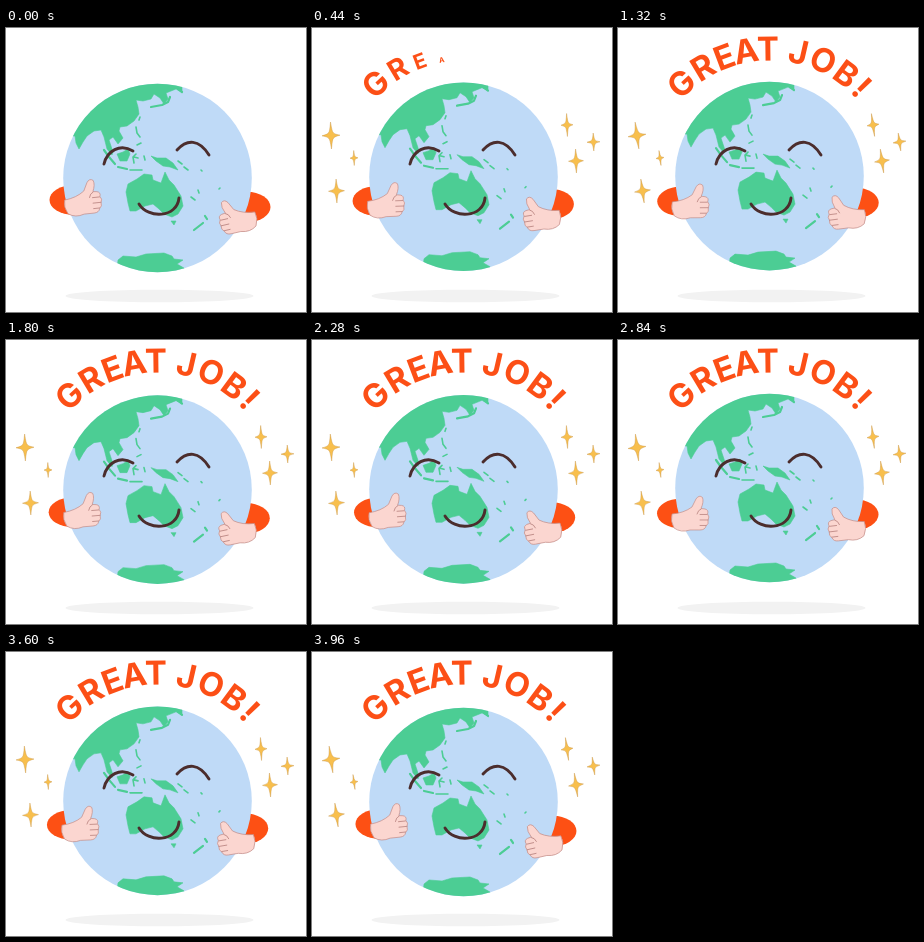
Recreate the animation shown at these times as an HTML page. Size 300x284 px, loop 4000 ms.

```html
<!DOCTYPE html>
<html lang="en">
<head>
<meta charset="utf-8">
<title>Great job</title>
<style>
  html, body { margin: 0; width: 100%; height: 100%; overflow: hidden; background: #fff; }
  svg { display: block; width: 100vw; height: 100vh; }
  text { font: 700 33px Inter, "Open Sans", sans-serif; fill: #fc4f16; text-anchor: middle; }
  .land { fill: #4ccd94; stroke: #4ccd94; stroke-width: .6; stroke-linejoin: round; }
  .isles { fill: none; stroke: #4ccd94; stroke-linecap: round; stroke-linejoin: round; }
  .face { fill: none; stroke: #4b2d2d; stroke-width: 2.9; stroke-linecap: round; }
  .hand { fill: #fbd6d0; stroke: #c58e89; stroke-width: .7; stroke-linejoin: round; }
  .crease { fill: none; stroke: #b98480; stroke-width: .8; stroke-linecap: round; }
  .sleeve { fill: #fd5014; }
  .star { fill: #f8bf4d; stroke: #c99543; stroke-width: .4; }
</style>
</head>
<body>
<svg viewBox="0 0 300 284">
  <defs>
    <clipPath id="disc"><circle cx="151.5" cy="150" r="94.3"/></clipPath>
    <g id="thumb">
      <path class="hand" d="M54 174Q66 173 74 167L78 159Q81 154.500 84.500 157.500Q86 162 83 168.500L87 169Q91 170 89.500 174Q92 177 90 180Q91 184 88 186Q87 190 82 190L72 190Q63 193 56 188Q52 181 54 174Z"/>
      <path class="crease" d="M83 169Q80 170 79 174M89 174.500L82 174.500M90 180L82 180M88 185.500L82 185.500"/>
    </g>
  </defs>

  <ellipse cx="153.500" cy="268" rx="94" ry="6.300" fill="#f2f2f2"/>
  <ellipse id="sleeveL" class="sleeve" cx="63" cy="173.500" rx="24" ry="14.800"/>
  <ellipse id="sleeveR" class="sleeve" cx="237" cy="174.500" rx="23.500" ry="15.200"/>

  <g id="globe">
    <circle cx="151.5" cy="150" r="94.3" fill="#bfdaf7"/>
    <g clip-path="url(#disc)">
      <path class="land" d="M60 108L60 50L176 50L176 64L170 61L160 65L162 71L158 76L154 70L148 66L145 71L137 73L130 72L132 79L133 86L128 93L121 98L114 99L113 103L117 110L112 116L107 109L103 112L107 124L106 127L101 121L98 109L95 102L88 103L81 108L77 114L73 121L70 115L69 108Z"/>
      <path class="land" d="M120 164L122 156L131 151L138 146L146 147L147 152L155 155L159 144L163 152L168 157L175 168L177 178L172 186L166 189L158 186L153 181L147 176L139 178L130 183L124 183L122 175Z"/>
      <path class="land" d="M112 232L117 228L130 229L140 226L158 225L166 228L168 231L177 232L171 236L178 240L180 250L110 250Z"/>
      <path class="land" d="M111 126L117 124L122 121L124 126L121 133L114 133Z"/>
      <path class="land" d="M145 128L151 130L160 130L167 135L172 142L164 139L157 138L150 133Z"/>
      <path class="land" d="M165 193L170 193L168 197Z"/>
      <path class="isles" stroke-width="2.200" d="M98 122L103 129L109 136M112 139L121 141M145 79L156 77L162 74L164 69M172 61L176 64M199 188L201 191M197 195L188 202"/>
      <path class="isles" stroke-width="1.600" d="M130 126L127 129L128 135M128 129L132 130M124 142L136 142M130 99L131 105L134 109M131 117L135 115M134 89L133 92M138 128L139 132M172 133L176 136M178 139L182 142M185 169L189 172M192 162L193 165M213 161L214 160M195 142L196 143"/>
    </g>
  </g>
  <path class="face" d="M98 136C101 123 114 115 127 123M171 122C181 111 193 111 203 127M133 176C142 191 171 190 173 170"/>

  <g id="handL"><use href="#thumb"/></g>
  <g id="handR"><use href="#thumb" transform="translate(300.500 9.500) rotate(-7 -70 175) scale(-1 1)"/></g>
  <g id="stars"></g>
  <g id="words"></g>
</svg>
<script>
const LOOP = 4000, STEP = 40;
const byId = id => document.getElementById(id);
const move = (node, value) => node.setAttribute("transform", value);
const easeOut = x => 1 - (1 - Math.min(1, Math.max(0, x))) ** 3;

function add(parent, tag, attrs, label = "") {
  const node = document.createElementNS("http://www.w3.org/2000/svg", tag);
  for (const key in attrs) node.setAttribute(key, attrs[key]);
  node.textContent = label;
  return byId(parent).appendChild(node);
}

// Angle of each letter on the arc over the globe.
const letters = [["G", -43], ["R", -31], ["E", -20.5], ["A", -10.5], ["T", -.7],
  ["J", 13], ["O", 24.5], ["B", 36.5], ["!", 45.5]]
  .map(([char, angle]) => ({ angle, node: add("words", "text", {}, char) }));

// Centre, half width and half height of each sparkle.
const stars = [[19, 107.5, 9, 13.5], [42, 130, 4, 7.5], [24.5, 163, 8, 12],
  [255, 97, 6, 11.5], [281.5, 114, 6.5, 9], [264, 133, 7.5, 12]]
  .map(([x, y, w, h]) => {
    const a = w * .27, b = h * .22;
    const d = `M0 ${-h}Q${a / 2} ${-b} ${a} ${-b}Q${a} ${-b / 2} ${w} 0Q${a} ${b / 2} ${a} ${b}` +
      `Q${a / 2} ${b} 0 ${h}Q${-a / 2} ${b} ${-a} ${b}Q${-a} ${b / 2} ${-w} 0Q${-a} ${-b / 2} ${-a} ${-b}Q${-a / 2} ${-b} 0 ${-h}Z`;
    return { x, y, node: add("stars", "path", { class: "star", d }) };
  });

function draw(t) {
  // Lingers at the top of each two-second bounce.
  const down = Math.cos(t / 2000 * Math.PI) ** 4;
  move(byId("globe"), `translate(0 ${-2 * (1 - down)})`);
  move(byId("sleeveL"), `translate(${4.5 * down} ${-1.5 * down})`);
  move(byId("sleeveR"), `translate(${4 * down} ${4.5 * down})`);
  move(byId("handL"), `translate(${4.5 * down} ${-4 * down}) rotate(${-6 * down} 74 174)`);
  move(byId("handR"), `translate(${3 * down} ${4 * down}) rotate(${-6 * down} 230 185)`);

  letters.forEach(({ angle, node }, i) => {
    const size = easeOut((t - 100 - 100 * i) / 500);
    move(node, `translate(151.5 150) rotate(${angle}) translate(0 -117.5) scale(${size})`);
  });

  const tilt = -4 - 4 * Math.cos(t / LOOP * 6 * Math.PI);
  const size = easeOut(t / 400);
  for (const { x, y, node } of stars)
    move(node, `translate(${x} ${y}) rotate(${tilt}) scale(${size})`);
}

const start = performance.now();
function tick() {
  const t = (performance.now() - start) % LOOP;
  draw(Math.floor(t / STEP) * STEP);
  requestAnimationFrame(tick);
}
tick();
</script>
</body>
</html>
```
